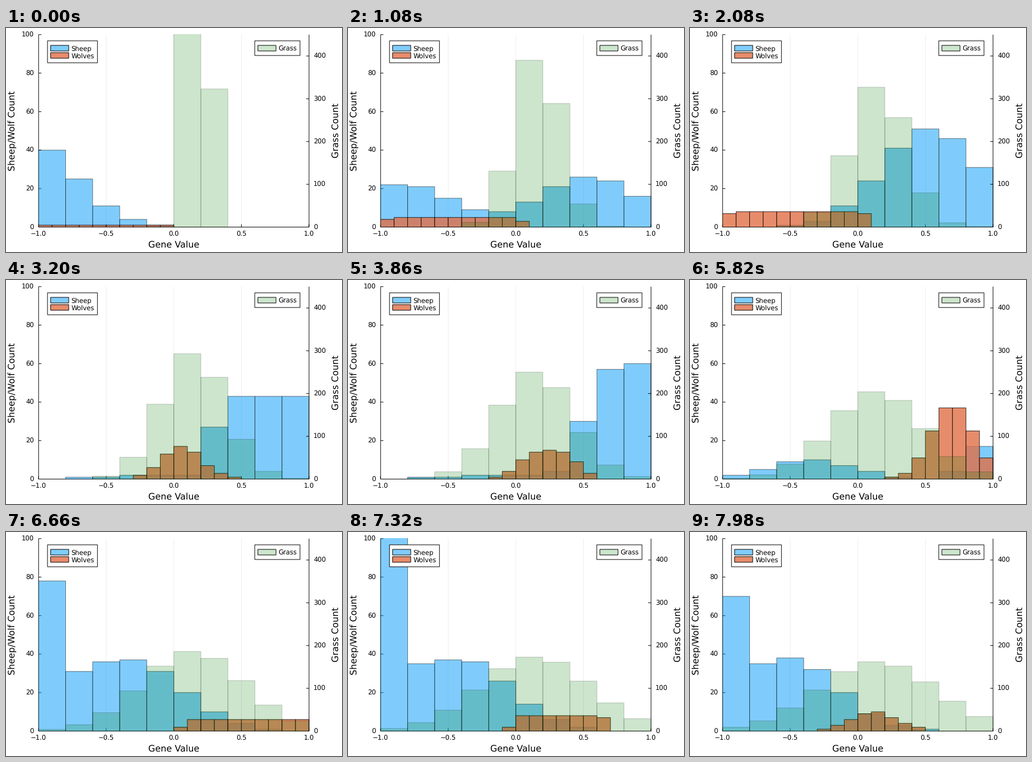
Recreate the animation shown at these times as a matplotlib script. Size 600 by 400 pixels, loop 8 s.

```python
import numpy as np
import matplotlib.pyplot as plt
from matplotlib.animation import FuncAnimation
from matplotlib.collections import PolyCollection
from matplotlib.patches import Rectangle

plt.rcParams["text.hinting"] = "none"

STEP, FRAMES = 20, 400
LEFT, RIGHT, TOP, BASE = 58.2, 541.1, 11.8, 355.5
PX = 0.72  # points per pixel at 100 dpi
SMALL, LARGE = 8.4, 11.55
BLUE, ORANGE, GREEN = "#009afa", "#e26f46", "#008000"


def px(value):
    return LEFT + (value + 1) / 2 * (RIGHT - LEFT)


def py(count, top):
    return BASE - count / top * (BASE - TOP)


def key(ms, height, centre, spread, power=2):
    """Shape of a group at one time; a higher power gives a flatter top."""
    return ms, height, centre, spread, power


def bump(keys, x, t):
    times, *params = zip(*keys)
    height, centre, spread, power = (np.interp(t, times, p) for p in params)
    return height * np.exp(-np.abs((x - centre) / spread) ** power)


SHEEP_LOW = [key(0, 47, -1.1, 0.5), key(2080, 0, -0.6, 0.5),
             key(3200, 2, -0.2, 0.5), key(4540, 2, -0.1, 0.5),
             key(5820, 10, -0.35, 0.45), key(6660, 38, -0.37, 0.58),
             key(7980, 38, -0.5, 0.5)]
SHEEP_EDGE = [key(5820, 0, -0.9, 0.12), key(6600, 60, -0.9, 0.12),
              key(7390, 85, -0.9, 0.12), key(7980, 50, -0.9, 0.12)]
SHEEP_HIGH = [key(0, 0, 0.54, 0.51), key(2080, 51, 0.54, 0.51),
              key(3200, 43, 0.85, 0.6, 8), key(4150, 68, 0.95, 0.4),
              key(4540, 53, 0.95, 0.4), key(5820, 18, 0.95, 0.2),
              key(6660, 0, 0.95, 0.2)]
WOLF_PACK = [key(0, 1.2, -0.5, 0.5, 20), key(2080, 8, -0.45, 0.57, 20),
             key(3200, 17, 0.06, 0.21), key(4540, 12.5, 0.42, 0.32, 4),
             key(5350, 59, 0.72, 0.2), key(5820, 39, 0.7, 0.22),
             key(6660, 6.5, 0.55, 0.5, 20), key(7980, 10, 0.12, 0.24)]
GRASS_SPREAD = [(0, 0.076), (830, 0.16), (2080, 0.209), (3200, 0.235),
                (4540, 0.32), (5820, 0.34), (7980, 0.43)]


def sheep(x, t):
    return sum(bump(k, x, t) for k in (SHEEP_LOW, SHEEP_EDGE, SHEEP_HIGH))


def wolves(x, t):
    return bump(WOLF_PACK, x, t)


def grass(x, t):
    """A fixed amount of grass that spreads out from a narrow peak."""
    spread = np.interp(t, *zip(*GRASS_SPREAD))
    centre = 0.14 + 0.05 * np.exp(-t / 1000)
    return 70 / spread * np.exp(-((x - centre) / spread) ** 2 / 2)


fig = plt.figure(figsize=(6, 4), dpi=100, facecolor="white")
ax = fig.add_axes([0, 0, 1, 1])
ax.set_xlim(0, 600)
ax.set_ylim(400, 0)
ax.axis("off")


def line(x0, y0, x1, y1, z=2, alpha=1):
    ax.plot([x0, x1], [y0, y1], lw=PX, color="black", alpha=alpha, zorder=z,
            solid_capstyle="butt", snap=False)


def label(x, y, text, size=SMALL, ha="center", rotation=0):
    ax.text(x, y, text, fontsize=size, family="DejaVu Sans", ha=ha,
            va="baseline", rotation=rotation, rotation_mode="anchor",
            zorder=12)


def box(x, y, w, h, color, z):
    ax.add_patch(Rectangle((x, y), w, h, lw=PX, ec="black", fc=color,
                           zorder=z, snap=False))


def legend(x, width, entries):
    box(x, 22.9, width, 13.2 + 13 * len(entries), "white", 10)
    for i, (name, color, alpha) in enumerate(entries):
        y = 31 + 13 * i
        box(x + 5.6, y, 32.3, 10, (color, alpha), 11)
        label(x + 42.3, y + 9.6, name, ha="left")


# Axes
for value in (-1, -0.5, 0, 0.5, 1):
    x = px(value)
    if abs(value) < 1:
        line(x, TOP, x, BASE, z=1, alpha=0.07)
    line(x, BASE, x, BASE - 5)
    label(x, 371.5, f"{value:.1f}".replace("-", "\u2212"))
for count in range(0, 101, 20):
    y = py(count, 100)
    line(LEFT, y, LEFT + 5, y)
    label(50, y + 4.2, str(count), ha="right")
for count in range(0, 401, 100):
    y = py(count, 450)
    line(RIGHT, y, RIGHT - 5, y, z=4.5)
    label(549, y + 4.2, str(count), ha="left")
line(LEFT, BASE, RIGHT, BASE)
line(LEFT, TOP, LEFT, BASE)
line(RIGHT, TOP, RIGHT, BASE, z=4.5)
label(299.3, 392, "Gene Value", LARGE)
label(16, 183.3, "Sheep/Wolf Count", LARGE, rotation=90)
label(594.8, 183.3, "Grass Count", LARGE, rotation=90)
legend(74.1, 89.2, [("Sheep", BLUE, 0.5), ("Wolves", ORANGE, 0.8)])
legend(444.2, 80.8, [("Grass", GREEN, 0.2)])

plot_area = Rectangle((58, 11), 484, 345, transform=ax.transData)


class Histogram:
    def __init__(self, rule, bins, top, color, alpha, z):
        self.rule, self.top = rule, top
        edges = np.linspace(-1, 1, bins + 1)
        self.centres = (edges[1:] + edges[:-1]) / 2
        self.edges = px(edges)
        self.bars = PolyCollection([], facecolors=color, edgecolors="black",
                                   linewidths=PX, alpha=alpha, zorder=z,
                                   snap=False)
        ax.add_collection(self.bars, autolim=False)
        self.bars.set_clip_path(plot_area)

    def update(self, t):
        counts = np.rint(self.rule(self.centres, t))
        tops = py(counts, self.top)
        self.bars.set_verts([
            [(a, BASE), (a, y), (b, y), (b, BASE)]
            for a, b, y, n in zip(self.edges, self.edges[1:], tops, counts)
            if n > 0])
        return self.bars


histograms = [
    Histogram(sheep, 10, 100, BLUE, 0.5, 3),
    Histogram(wolves, 20, 100, ORANGE, 0.8, 4),
    Histogram(grass, 10, 450, GREEN, 0.2, 5),
]


def update(frame):
    return [h.update(frame * STEP) for h in histograms]


anim = FuncAnimation(fig, update, frames=FRAMES, interval=STEP,
                     repeat=True, repeat_delay=0, blit=False)
plt.show()
```
